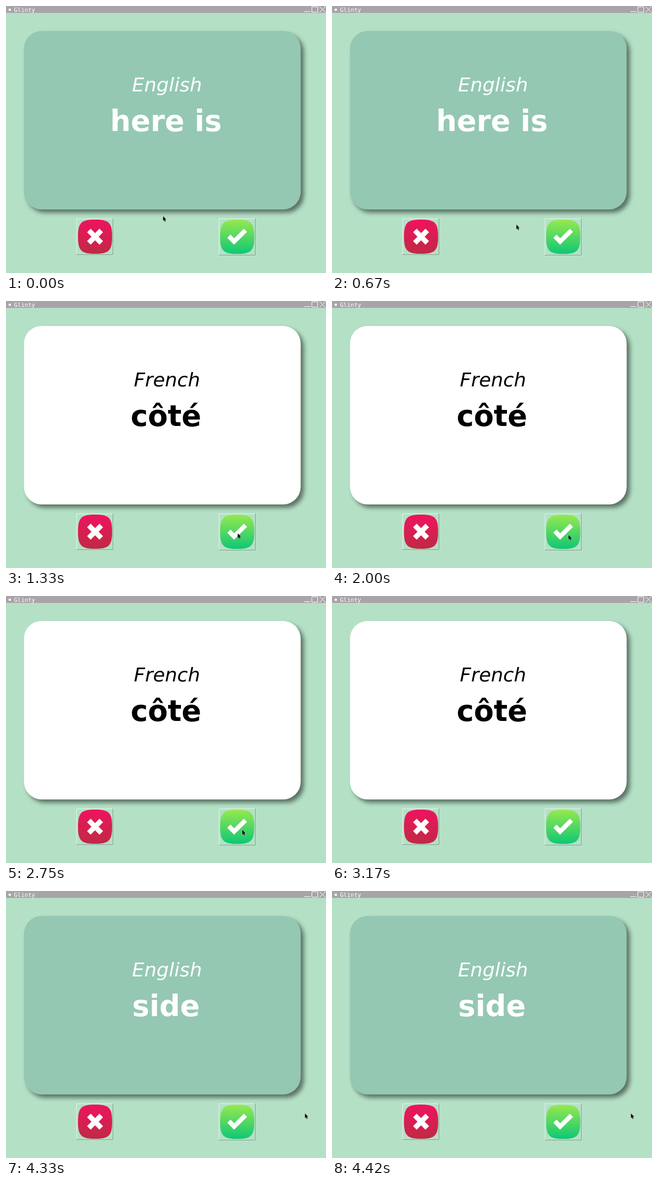
Animation, 600 px wide and 500 px high, one loop 5.01 s. Source, as an HTML page:

```html
<!DOCTYPE html>
<html lang="en">
<head>
<meta charset="utf-8">
<title>Glinty</title>
<style>
html, body { margin: 0; width: 100%; height: 100%; overflow: hidden; background: #b4e1c6; }
svg { display: block; width: 600px; height: 500px; }
text { font-family: "DejaVu Sans", sans-serif; text-anchor: middle; }
.bar { font: 11px "DejaVu Sans Mono", monospace; text-anchor: start; fill: #fff; }
.lang { font-size: 36.3px; font-style: italic; }
.word { font-size: 54.4px; font-weight: bold; }
.back { fill: #94c8b2; }
.white { fill: #fff; }
.line { fill: none; stroke: #fff; }
.lit, .dim { fill: none; stroke-width: 1; }
.lit { stroke: #e3f4ea; }
.dim { stroke: #8a9c92; }

.first, .french, .second, .push, .sink .lit, .sink .dim, .cursor {
  animation: 5010ms step-end infinite;
}
.first { animation-name: first; }
.french { animation-name: french; }
.second { animation-name: second; }
.push { animation-name: push; }
.sink .lit { animation-name: sinkLit; }
.sink .dim { animation-name: sinkDim; }
.cursor { animation-name: move; }

@keyframes first { 0% { opacity: 1; } 26.54%, 100% { opacity: 0; } }
@keyframes french { 0% { opacity: 0; } 26.54% { opacity: 1; } 86.42%, 100% { opacity: 0; } }
@keyframes second { 0% { opacity: 0; } 86.42%, 100% { opacity: 1; } }
@keyframes push {
  0%, 26.54%, 100% { transform: none; }
  23.34% { transform: translate(1px, 1px); }
}
@keyframes sinkLit { 0%, 26.54%, 100% { stroke: #e3f4ea; } 23.34% { stroke: #8a9c92; } }
@keyframes sinkDim { 0%, 26.54%, 100% { stroke: #8a9c92; } 23.34% { stroke: #e3f4ea; } }

/* The pointer is sampled at 12 positions a second. */
@keyframes move {
  0% { transform: translate(294.5px, 393.5px); animation-timing-function: steps(3); }
  4.98% { transform: translate(310px, 399px); }
  9.9% { transform: translate(310px, 399px); animation-timing-function: steps(7); }
  21.54% { transform: translate(434.5px, 435px); }
  33.24% { transform: translate(434.5px, 435px); animation-timing-function: steps(4); }
  39.9% { transform: translate(443.5px, 438px); }
  54.88% { transform: translate(443px, 438px); }
  59.86% { transform: translate(497px, 438px); }
  61.5% { transform: translate(551px, 434px); }
  63.25% { transform: translate(608px, 430px); }
  66.45% { transform: translate(591px, 428px); animation-timing-function: steps(3); }
  71.44% { transform: translate(589px, 425px); }
  74.84% { transform: translate(589px, 425px); animation-timing-function: steps(5); }
  83.2%, 100% { transform: translate(560.5px, 416.5px); }
}
</style>
</head>
<body>
<svg viewBox="0 0 600 500">
  <defs>
    <linearGradient id="red" x2="0" y2="1">
      <stop stop-color="#f0135f"/><stop offset="1" stop-color="#bf2a44"/>
    </linearGradient>
    <linearGradient id="green" x2="0" y2="1">
      <stop stop-color="#96e94e"/><stop offset="1" stop-color="#0fc775"/>
    </linearGradient>
    <filter id="soft" x="-10%" y="-10%" width="120%" height="120%">
      <feGaussianBlur stdDeviation="4"/>
    </filter>
    <path id="tile" d="M0 32C0 6 6 0 32 0S64 6 64 32 58 64 32 64 0 58 0 32Z"/>
    <rect id="card" x="33.7" y="46.7" width="518.8" height="334.3" rx="33"/>
  </defs>

  <rect width="600" height="500" fill="#b4e1c6"/>

  <rect width="600" height="13" fill="#a9a4a8"/>
  <rect class="white" x="5" y="5" width="4" height="4"/>
  <text class="bar" x="15" y="11">Glinty</text>
  <path class="line" d="M559 10.5H571M573.5 1.5H584.5V11.5H573.5ZM588 1L599 12M599 1L588 12"/>

  <use href="#card" x="6" y="6" fill="#000" opacity=".5" filter="url(#soft)"/>

  <g class="first white">
    <use href="#card" class="back"/>
    <text class="lang" x="301.9" y="160">English</text>
    <text class="word" x="300" y="234.3">here is</text>
  </g>
  <g class="french">
    <use href="#card" class="white"/>
    <text class="lang" x="301.9" y="160">French</text>
    <text class="word" x="300" y="234.3">côté</text>
  </g>
  <g class="second white">
    <use href="#card" class="back"/>
    <text class="lang" x="301.9" y="160">English</text>
    <text class="word" x="300" y="234.3">side</text>
  </g>

  <g>
    <path class="lit" d="M132.5 466V398.5H201"/>
    <path class="dim" d="M132 465.5H200.5V398"/>
    <use href="#tile" x="135" y="400" fill="url(#red)"/>
    <path class="line" stroke-width="9.5" d="M155.4 420.4L178.6 443.6M178.6 420.4L155.4 443.6"/>
  </g>

  <g class="sink">
    <path class="lit" d="M399.5 467V398.5H468"/>
    <path class="dim" d="M399 466.5H467.5V398"/>
    <g class="push">
      <use href="#tile" x="401.5" y="400.2" fill="url(#green)"/>
      <path class="line" stroke-width="8.5" d="M418 431L427.7 441L449 420"/>
    </g>
  </g>

  <path class="cursor" d="M0 0V8.8L2 7.2 3.5 10.4 5 9.7 3.6 6.6H6.2Z"
    stroke="#fff" stroke-opacity=".6" stroke-width="1" paint-order="stroke"/>
</svg>
</body>
</html>
```
